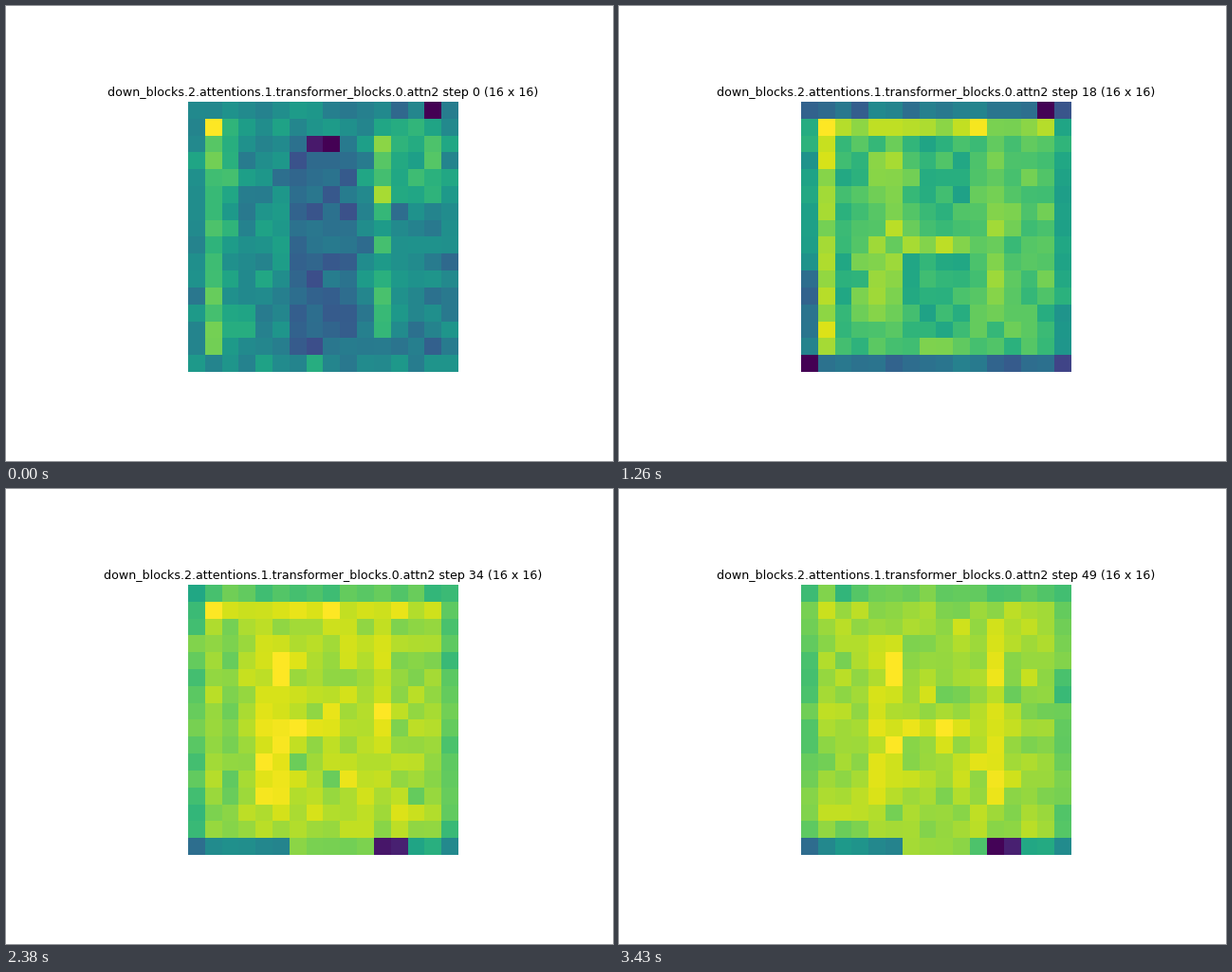
Animation of 640x480 px, one loop 3500 ms. Source, as a matplotlib script:

```python
import numpy as np
import matplotlib.pyplot as plt
from matplotlib.animation import FuncAnimation

W, H, DPI = 640, 480, 100
FRAMES, INTERVAL, N = 50, 70, 16
LAYER = "down_blocks.2.attentions.1.transformer_blocks.0.attn2"
GRAIN_SPAN = 8  # steps until the grain has fully changed
START, END = -99, 99

# Shapes that emerge and fade: row, column, height, width, boost, fade in, fade out
SHAPES = [
    (1, 1, 14, 1, .23, START, 28),     # left stem
    (1, 2, 13, 1, .15, START, 5),
    (2, 2, 12, 1, -.10, 5, 45),
    (3, 4, 10, 2, .13, 6, END),        # inner stems and crossbar
    (2, 11, 11, 1, .15, START, END),
    (8, 6, 1, 4, .17, 14, END),
    (1, 1, 1, 14, .22, 6, 40),         # top bar
    (1, 11, 5, 4, .16, START, 6),
    (2, 6, 13, 4, -.17, START, 7),     # dark centre
    (9, 6, 5, 4, -.12, 9, 28),
    (2, 7, 5, 3, -.14, 6, 26),
    (2, 4, 13, 7, .08, 29, 40),        # glowing body
    (10, 0, 6, 1, -.30, 13, 31),       # cold border cells
    (15, 0, 1, 6, -.25, 22, END),
    (15, 11, 1, 2, -1.1, 22, END),
    (15, 6, 1, 5, .40, 23, END),
    (0, 14, 1, 1, -.60, START, 29),
    (1, 1, 1, 1, .60, START, 30),      # hot corner
    (2, 7, 1, 2, -.40, START, 4),
    (4, 5, 2, 1, .20, 22, END),
]


def ramp(x, width=2):
    return 1 / (1 + np.exp(-x / width))


def grain(step):
    """Unit noise that drifts smoothly from one seeded field to the next."""
    i, phase = divmod(step, GRAIN_SPAN)
    now, later = (np.random.default_rng(k).normal(0, 1, (N, N)) for k in (i, i + 1))
    angle = phase / GRAIN_SPAN * np.pi / 2
    return np.cos(angle) * now + np.sin(angle) * later


def attention(step):
    rise = ramp(step - 14.5, 5.5)
    contrast = 1 - .5 * rise
    border = ramp(step - 7) * contrast

    grid = .46 + .4 * rise + (.06 - .025 * rise) * grain(step)
    grid[:, [0, -1]] -= .2 * border
    grid[0] -= (.22 + .25 * ramp(27 - step)) * border
    grid[-1] -= .5 * border
    for row, col, height, width, boost, begin, finish in SHAPES:
        strength = ramp(step - begin) * ramp(finish - step) * contrast
        grid[row:row + height, col:col + width] += boost * strength
    return np.clip(grid, 0, 1)


fig = plt.figure(figsize=(W / DPI, H / DPI), dpi=DPI, facecolor="white")
left, top, side = 191.9, 101.3, 284.6
ax = fig.add_axes([left / W, 1 - (top + side) / H, side / W, side / H])
ax.axis("off")
image = ax.imshow(attention(0), cmap="viridis", vmin=0, vmax=1, aspect="auto",
                  interpolation="nearest")
title = ax.set_title("", fontsize=9.14, pad=4.6, fontname="DejaVu Sans")


def draw(step):
    image.set_data(attention(step))
    title.set_text(f"{LAYER} step {step} ({N} x {N})")
    return image, title


anim = FuncAnimation(fig, draw, frames=FRAMES, interval=INTERVAL,
                     repeat=True, repeat_delay=0, blit=False)
plt.show()
```
